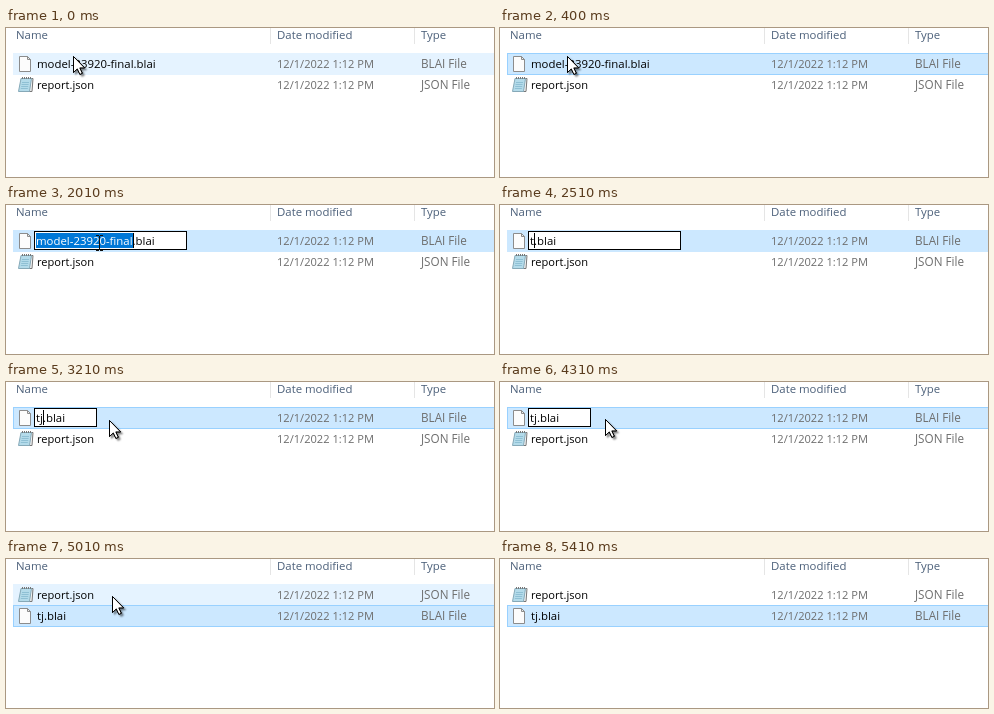
An HTML page with a canvas for the animation above (6.01 s loop, 488 px wide and 149 px high).

```html
<!DOCTYPE html>
<html lang="en">
<head>
<meta charset="utf-8">
<title>Renaming a file</title>
<style>
html, body { margin: 0; width: 488px; height: 149px; overflow: hidden; background: #fff; }
canvas { display: block; }
</style>
</head>
<body>
<canvas id="stage" width="488" height="149"></canvas>
<script>
const c = document.getElementById("stage").getContext("2d");
const LOOP = 6010, ROW_Y = [25, 46];

// Pointer steps: time, kind, x, y. Typing hides the pointer.
const pointer = [
  [0, "arrow", 67, 28], [600, "arrow", 88, 32],
  [900, "beam", 91, 32], [1000, "beam", 91, 34], [1100, "beam", 92, 36], [1200, "beam", 93, 38],
  [2510, "none"],
  [2810, "arrow", 94, 38], [2910, "arrow", 97, 38], [3010, "arrow", 100, 38], [3110, "arrow", 102, 38],
  [3210, "arrow", 103, 38], [4310, "arrow", 105, 37], [4510, "arrow", 106, 37], [5410, "none"]
];
const clicks = [300, 500, 4710];

function rect(x, y, w, h, fill, stroke) {
  c.fillStyle = fill;
  c.fillRect(x, y, w, h);
  if (!stroke) return;
  c.strokeStyle = stroke;
  c.lineWidth = 1;
  c.strokeRect(x + .5, y + .5, w - 1, h - 1);
}

function text(s, x, y, color, size = 11.4) {
  c.font = size + "px 'Open Sans', 'Noto Sans', sans-serif";
  c.fillStyle = color;
  c.fillText(s, x, y);
}

function shape(points, fill, stroke) {
  c.beginPath();
  points.forEach(([x, y]) => c.lineTo(x, y));
  c.closePath();
  c.fillStyle = fill;
  c.fill();
  c.strokeStyle = stroke;
  c.lineWidth = 1;
  c.stroke();
}

function pageIcon(y) {
  shape([[13.5, y + .5], [21.5, y + .5], [24.5, y + 3.5], [24.5, y + 15.5], [13.5, y + 15.5]], "#fcfcfc", "#8c8c8c");
  shape([[21.5, y + .5], [21.5, y + 3.5], [24.5, y + 3.5]], "#eee", "#8c8c8c");
}

function notepadIcon(y) {
  shape([[16, y + 1.5], [27, y + 1.5], [26, y + 14.5], [14, y + 14.5]], "#f4f4f4", "#777");
  shape([[15, y + 1.5], [25.5, y + 1.5], [23.5, y + 14.5], [12.5, y + 14.5]], "#b4dbea", "#86a9b8");
  for (let i = 0; i < 4; i++) rect(16 - i * .4, y + 5 + i * 2, 7, 1, "#8fc0d4");
  for (let i = 0; i < 5; i++) rect(16 + i * 2, y, 1, 2, "#777");
}

function fileRow(row, name, type, icon) {
  const y = ROW_Y[row], base = y + 15;
  icon(y + 3);
  if (name) text(name, 31, base, "#000", type[0] === "J" ? 11.1 : 11.4);
  text("12/1/2022 1:12 PM", 271, base, "#6d6d6d", 11.1);
  text(type, 415, base, "#6d6d6d", 11.7);
}

function editor(t) {
  const stem = t < 2510 ? "model-23920-final" : t < 2710 ? "t" : "tj";
  rect(28, 26, t < 2710 ? 153 : 63, 19, "#fff", "#000");
  text(stem + ".blai", 30, 40, "#000");
  if (t < 2510) {
    rect(30, 28, 97, 15, "#0078d7");
    text(stem, 30, 40, "#fff");
    if (t < 1500 || t >= 2010) rect(127, 28, 1, 15, "#000");
  } else if (t < 3710) {
    rect(t < 2710 ? 34 : 37, 28, 1, 15, "#000");
  }
}

function arrow(x, y) {
  c.save();
  c.translate(x, y);
  c.shadowColor = "rgba(0,0,0,.4)";
  c.shadowOffsetX = c.shadowOffsetY = 2;
  c.shadowBlur = 2;
  const points = [[.5, .5], [.5, 16.5], [4.3, 12.9], [6.9, 18.4], [9.3, 17.3], [6.8, 11.9], [11.6, 11.9]];
  shape(points, "#fff", "#000");
  c.shadowColor = "transparent";
  shape(points, "#fff", "#000");
  c.restore();
}

function beam(x, y) {
  for (const top of [y - 8, y + 7]) {
    rect(x - 3, top, 3, 1, "#111");
    rect(x + 1, top, 3, 1, "#111");
  }
  rect(x, y - 7, 1, 14, "#111");
}

function draw(t) {
  const [, kind, px, py] = pointer.findLast(p => p[0] <= t);
  const editing = t >= 900 && t < 5010, sorted = t >= 5010;
  const hover = kind === "arrow";

  rect(0, 0, 488, 149, "#fff");
  for (const x of [264, 408]) rect(x, 0, 1, 16, "#e5e5e5");
  text("Name", 10, 11, "#4c607a");
  text("Date modified", 271, 11, "#4c607a");
  text("Type", 415, 11, "#4c607a");

  if (sorted) {
    if (hover) rect(7, 25, 490, 22, "#e5f3ff");
    rect(7, 46, 490, 22, "#cce8ff", "#99d1ff");
  } else if (t < 300) {
    rect(7, 25, 490, 22, "#e5f3ff");
  } else {
    rect(7, 25, 490, 22, "#cce8ff", hover && "#99d1ff");
  }

  fileRow(sorted ? 0 : 1, "report.json", "JSON File", notepadIcon);
  const name = sorted ? "tj.blai" : editing ? "" : "model-23920-final.blai";
  fileRow(sorted ? 1 : 0, name, "BLAI File", pageIcon);
  if (editing) editor(t);

  if (hover) arrow(px, py);
  if (kind === "beam") beam(px, py);
  if (clicks.some(s => t >= s && t < s + 100)) {
    c.beginPath();
    c.arc(px + 1, py + 1, 12, 0, 7);
    c.fillStyle = "rgba(255,255,0,.47)";
    c.fill();
  }
}

const start = performance.now();
function tick() {
  draw((performance.now() - start) % LOOP);
  requestAnimationFrame(tick);
}
tick();
</script>
</body>
</html>
```
